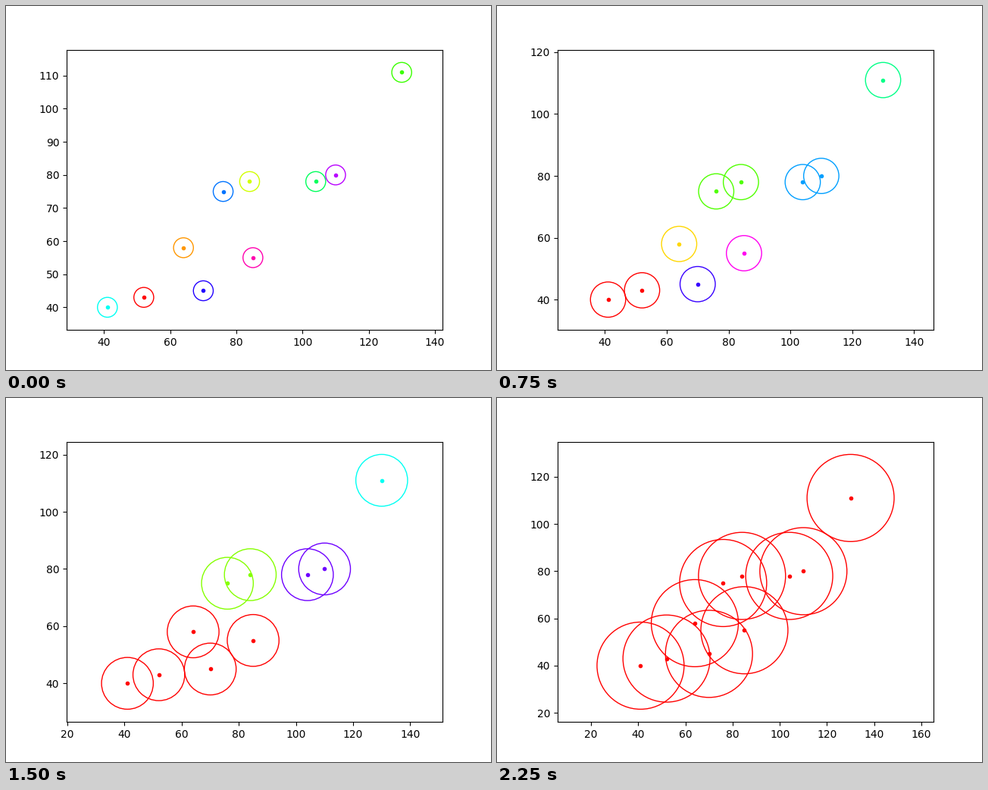
These frames come from a looping animation (640x480 px, 2.5 s). A matplotlib script:

```python
"""Single-linkage clustering: circles grow until the next two clusters touch."""
import math
from itertools import combinations, product

import matplotlib.pyplot as plt
from matplotlib.animation import FuncAnimation

POINTS = [(52, 43), (64, 58), (84, 78), (130, 111), (104, 78),
          (41, 40), (76, 75), (70, 45), (110, 80), (85, 55)]
START_RADIUS = 3
INTERVAL = 250


def gap(a, b):
    """Smallest distance between members of two clusters."""
    return min(math.dist(p, q) for p, q in product(a, b))


def build_steps():
    """List of (radius, clusters), from all separate to one cluster."""
    clusters = [[p] for p in POINTS]
    steps = [(START_RADIUS, clusters)]
    while len(clusters) > 1:
        i, j = min(combinations(range(len(clusters)), 2),
                   key=lambda ij: gap(clusters[ij[0]], clusters[ij[1]]))
        radius = gap(clusters[i], clusters[j]) / 2
        merged = clusters[i] + clusters[j]
        clusters = clusters[:i] + [merged] + clusters[i + 1:j] + clusters[j + 1:]
        steps.append((radius, clusters))
    return steps


STEPS = build_steps()
fig, ax = plt.subplots(figsize=(6.4, 4.8), dpi=100)


def draw(frame):
    radius, clusters = STEPS[frame]
    ax.clear()
    colors = plt.get_cmap("hsv", len(clusters) + 1)
    for index, cluster in enumerate(clusters):
        color = colors(index)
        for x, y in cluster:
            ax.plot(x, y, ".", color=color)
            ax.add_patch(plt.Circle((x, y), radius, color=color, fill=False))
    ax.axis("equal")


anim = FuncAnimation(fig, draw, frames=len(STEPS), interval=INTERVAL,
                     init_func=lambda: None, repeat=True, repeat_delay=0)
plt.show()
```
